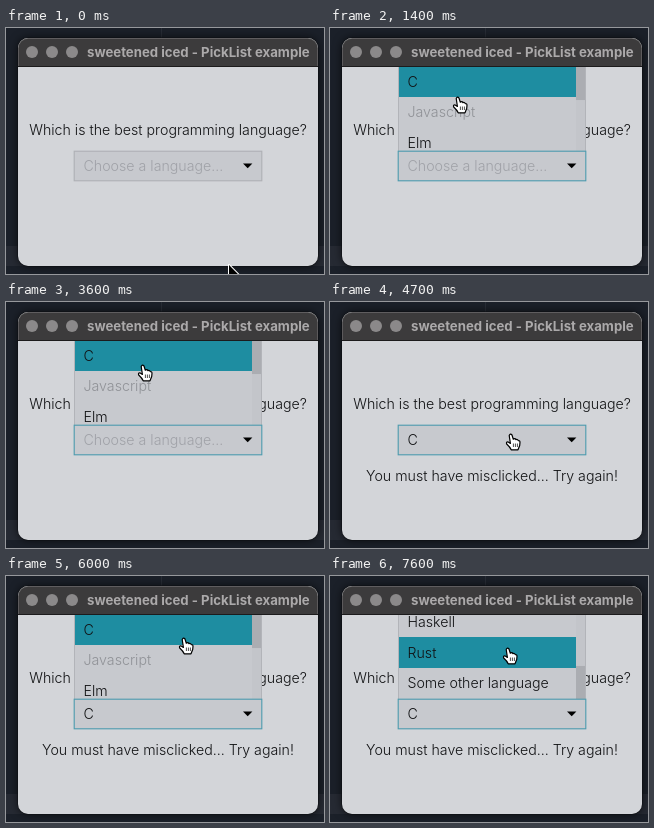
Animation, 318 px wide and 246 px high, one loop 8 s. Source, as an HTML page with a canvas:

```html
<!DOCTYPE html>
<html lang="en">
<head>
<meta charset="utf-8">
<title>PickList example</title>
<style>
  html, body { margin: 0; width: 318px; height: 246px; overflow: hidden; background: #1b2029; }
  canvas { display: block; }
</style>
</head>
<body>
<canvas width="318" height="246"></canvas>
<script>
const ctx = document.querySelector('canvas').getContext('2d');
const LOOP = 8000, STEP = 100;
const LEFT = 68, WIDTH = 188, RIGHT = LEFT + WIDTH, BAR = 10;
const MENU_TOP = 39, PICKER_TOP = 123, PICKER_H = 30;
const ROW = 30.5, VIEW = PICKER_TOP - MENU_TOP;
const INK = '#111214', BOX = '#c7c9ce', EDGE = '#b2b4b9', TEAL = '#1e8da1';
const BODY_FONT = '300 14.2px Inter, sans-serif', TITLE_FONT = 'bold 13.2px Inter, sans-serif';

const languages = ['C', 'Javascript', 'Elm', 'Ruby', 'Haskell', 'Rust', 'Some other language'];
const DISABLED = 1;
const LIST_H = ROW * languages.length;
const MAX_SCROLL = LIST_H - VIEW + .2;

const OPEN_1 = 1000, PICK = 3900, OPEN_2 = 4800;
const flicks = [6200, 6700, 7300];

// Pointer moves: start, end, and where the tip arrives
const moves = [
  [0, 900, 190, 138],
  [1000, 1400, 128, 69],
  [1600, 2300, 130, 109],
  [2400, 2500, 138, 79],
  [2500, 3000, 148, 83],
  [3100, 3600, 137, 63],
  [4200, 4500, 181, 132],
  [4900, 5200, 181, 107],
  [5500, 6000, 178, 62],
  [6200, 6600, 178, 72]
];

function ease(t, start, end) {
  const u = Math.min(1, Math.max(0, (t - start) / (end - start)));
  return u * u * (3 - 2 * u);
}

function pointerAt(t) {
  let x = 223, y = 237;
  for (const [start, end, toX, toY] of moves) {
    const u = ease(t, start, end);
    x += (toX - x) * u;
    y += (toY - y) * u;
  }
  return [x, y];
}

const scrollAt = t =>
  MAX_SCROLL * flicks.reduce((sum, start) => sum + ease(t, start, start + 300), 0) / flicks.length;

// Row under the pointer, or -1 when there is none that can be picked
function rowAt(t) {
  const [x, y] = pointerAt(t);
  if (x < LEFT || x > RIGHT - BAR || y < MENU_TOP || y >= PICKER_TOP) return -1;
  const row = Math.floor((y - MENU_TOP + scrollAt(t)) / ROW);
  return row === DISABLED ? -1 : row;
}

// The highlight stays on the last row that could be picked
function highlightAt(t, opened, row) {
  for (let s = opened; s <= t; s += STEP) {
    const under = rowAt(s);
    if (under >= 0) row = under;
  }
  return row;
}

function rect(x, y, w, h, color) {
  ctx.fillStyle = color;
  ctx.fillRect(x, y, w, h);
}

function panel(x, y, w, h, radii, color) {
  ctx.beginPath();
  ctx.roundRect(x, y, w, h, radii);
  ctx.fillStyle = color;
  ctx.fill();
}

function text(str, x, y, color = INK, align = 'left', font = BODY_FONT) {
  ctx.font = font;
  ctx.textAlign = align;
  ctx.fillStyle = color;
  ctx.fillText(str, x, y);
}

function drawWindow() {
  rect(0, 0, 318, 246, '#1b2029');
  rect(155, 0, 1, 10, '#282d36');
  rect(0, 218, 318, 20, '#262a33');
  ctx.save();
  ctx.shadowColor = 'rgba(0,0,0,.6)';
  ctx.shadowBlur = 8;
  panel(11.5, 9.5, 301, 229, 10.5, '#0c0e12');
  ctx.restore();
  panel(12, 10, 300, 228, 10, '#d3d5d9');
  panel(12, 10, 300, 29, [10, 10, 0, 0], '#6a696a');
  panel(12.7, 10.8, 298.6, 28.2, [9.5, 9.5, 0, 0], '#3c3b3c');
  rect(12, 38, 300, 1, '#1c1b1c');
  for (const x of [26, 46, 66]) panel(x - 6, 18, 12, 12, 6, '#8b898a');
  text('sweetened iced - PickList example', 81, 28.5, '#aba9aa', 'left', TITLE_FONT);
  text('Which is the best programming language?', 162, 107, INK, 'center');
}

function drawPicker(active, picked) {
  rect(LEFT, PICKER_TOP, WIDTH, PICKER_H, BOX);
  ctx.strokeStyle = active ? '#4c9bae' : '#aeb0b5';
  ctx.lineWidth = 1.1;
  ctx.strokeRect(LEFT + .2, PICKER_TOP + .2, WIDTH - .4, PICKER_H - .4);
  text(picked ? 'C' : 'Choose a language...', 77.5, 143, picked ? INK : '#a0a2a8');
  ctx.fillStyle = '#000';
  ctx.fill(new Path2D('M237 135.5H246.4L241.7 140.2Z'));
}

function drawMenu(scroll, highlight) {
  ctx.save();
  ctx.beginPath();
  ctx.rect(LEFT, MENU_TOP, WIDTH, VIEW);
  ctx.clip();
  rect(LEFT, MENU_TOP, WIDTH, VIEW, BOX);
  languages.forEach((name, i) => {
    const y = MENU_TOP + i * ROW - scroll;
    const top = Math.floor(y);
    if (i === highlight) rect(LEFT + 1, top, WIDTH - BAR - 1, Math.floor(y + ROW) - top, TEAL);
    text(name, 77.5, Math.round(y + 19.9), i === DISABLED ? '#909297' : INK);
  });
  const thumb = VIEW * VIEW / LIST_H;
  rect(RIGHT - BAR, MENU_TOP, BAR, VIEW, '#c3c5ca');
  rect(RIGHT - BAR, MENU_TOP + scroll / MAX_SCROLL * (VIEW - thumb), BAR - 1, thumb, '#abadb2');
  rect(LEFT, MENU_TOP, 1, VIEW, EDGE);
  rect(RIGHT - 1, MENU_TOP, 1, VIEW, EDGE);
  ctx.restore();
}

const arrow = new Path2D('M0 0V14L3.3 11L5.6 16.2L8 15.2L5.8 10.1H10Z');
const hand = new Path2D('M-1.8 1.5Q-.6-.9 1 1L2.3 5.2Q3.9 4 4.9 5.6Q6.5 4.9 7.3 6.6Q9 6.4 9 8.4L8.7 11.5L7 15.8H.2Q-1 13-4.3 10Q-5.2 7.6-2.8 8L-.6 9.4Z');
const fingers = new Path2D('M2.4 9.5V13M4.4 9.5V13M6.4 9.5V13');

function drawPointer(x, y, isHand) {
  ctx.save();
  ctx.translate(x, y);
  ctx.lineJoin = 'round';
  ctx.fillStyle = isHand ? '#fff' : '#000';
  ctx.strokeStyle = isHand ? '#000' : '#fff';
  if (isHand) {
    ctx.lineWidth = 1.2;
    ctx.fill(hand);
    ctx.stroke(hand);
    ctx.lineWidth = .7;
    ctx.stroke(fingers);
  } else {
    ctx.lineWidth = 2;
    ctx.stroke(arrow);
    ctx.fill(arrow);
  }
  ctx.restore();
}

function draw(now) {
  const t = Math.floor(now % LOOP / STEP) * STEP;
  const [x, y] = pointerAt(t);
  const picked = t >= PICK;
  const open = picked ? t >= OPEN_2 : t >= OPEN_1;
  const overPicker = x > LEFT && x < RIGHT && y > PICKER_TOP && y < PICKER_TOP + PICKER_H;

  drawWindow();
  if (open) drawMenu(scrollAt(t), picked ? highlightAt(t, OPEN_2, 0) : highlightAt(t, OPEN_1, -1));
  drawPicker(open || overPicker, picked);
  if (picked) text('You must have misclicked... Try again!', 162, 179, INK, 'center');
  drawPointer(x, y, overPicker || (open && rowAt(t) >= 0));
  requestAnimationFrame(draw);
}
requestAnimationFrame(draw);
</script>
</body>
</html>
```
